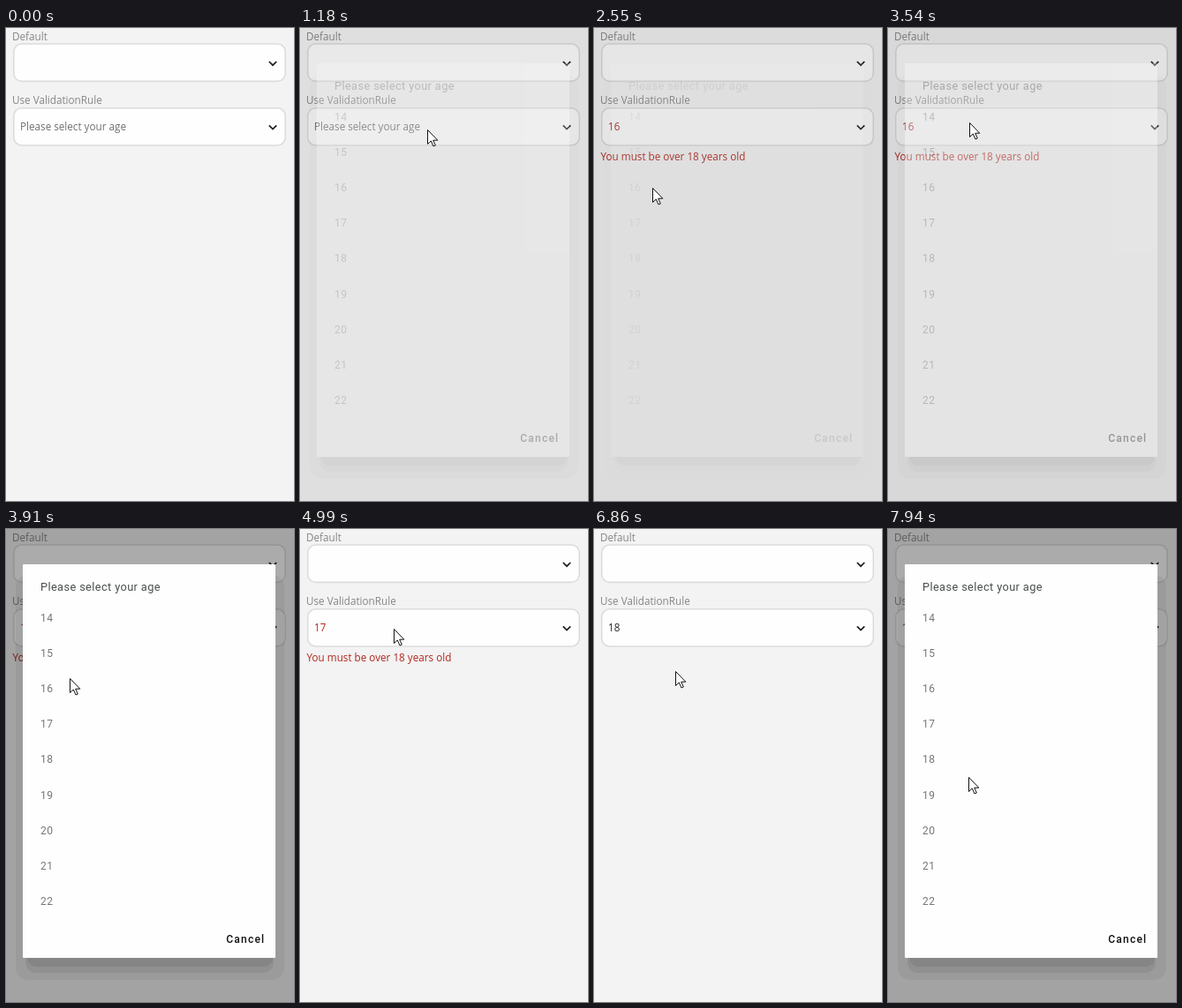
Recreate the animation shown at these times as an HTML page. Size 326 by 536 pixels, loop 7990 ms.

```html
<!DOCTYPE html>
<html lang="en">
<head>
<meta charset="utf-8">
<title>Age picker with validation</title>
<style>
  html, body { margin: 0; width: 100%; height: 100%; overflow: hidden; background: #f3f3f3; }
  svg { display: block; }
  .form { font: 11.7px "Open Sans", sans-serif; }
  .label { fill: #868686; }
  .field { fill: #fefefe; stroke: #dcdcdc; stroke-width: 1.6; }
  .chevron { fill: none; stroke: #1c1c1c; stroke-width: 1.7; }
  .dialog { font: 12px Roboto, sans-serif; }
  .title { font-size: 12.75px; letter-spacing: .03125em; fill: #474d4d; }
  .item { letter-spacing: .4px; fill: #757575; }
  .cancel { font-weight: 500; letter-spacing: 1.2px; fill: #111; }
</style>
</head>
<body>
<svg width="326" height="536" viewBox="0 0 326 536">
  <defs>
    <clipPath id="outside"><path clip-rule="evenodd" d="M0 0H326V536H0ZM19 40V486H305V40Z"/></clipPath>
  </defs>
  <rect width="326" height="536" fill="#f3f3f3"/>
  <g class="form">
    <text class="label" x="7" y="13.5">Default</text>
    <rect class="field" x="8.8" y="18" width="307.4" height="42.4" rx="9"/>
    <path class="chevron" d="M297.8 38L302 42.2L306.2 38"/>
    <text class="label" x="7" y="86">Use ValidationRule</text>
    <rect class="field" x="8.8" y="90.8" width="307.4" height="42.2" rx="9"/>
    <path class="chevron" d="M297.8 110.4L302 114.6L306.2 110.4"/>
    <text id="value" x="16" y="116"></text>
    <text id="error" x="7.6" y="150" fill="#b3261e">You must be over 18 years old</text>
  </g>
  <rect id="dim" width="326" height="536"/>
  <g clip-path="url(#outside)">
    <g id="halo">
      <rect x="11" y="52" width="304" height="459" rx="14" opacity=".05"/>
      <rect x="22" y="60" width="281" height="443" rx="12" opacity=".07"/>
    </g>
    <rect id="core" x="24" y="60" width="278" height="436" rx="10"/>
  </g>
  <g id="dialog" class="dialog">
    <rect x="19" y="40" width="286" height="446" rx="1" fill="#fefefe"/>
    <text class="title" x="39" y="69.5">Please select your age</text>
    <g id="items"></g>
    <text class="cancel" x="249.3" y="468.5">Cancel</text>
  </g>
  <path id="cursor" d="M.5 .5V16.5L4.3 13L7 19L9.3 18L6.7 12.2H11.8Z" fill="#fff" stroke="#111"/>
</svg>
<script>
const LOOP = 7990;
const $ = id => document.getElementById(id);

// [start, end, x, y]: the pointer glides to x, y
const moves = [
  [230, 790, 144, 115],
  [1790, 2120, 66, 181],
  [2740, 2920, 92, 107],
  [3770, 4280, 54, 223],
  [4740, 4990, 106, 113],
  [5540, 5830, 79, 262],
  [6720, 7090, 98, 112],
  [7800, 7940, 91, 281]
];
const opens = [[1180, 1320], [3540, 3630], [5360, 5500], [7610, 7750]];
const closes = [[2460, 2600], [4560, 4700], [6250, 6390]];
const picks = ["16", "17", "18"];

for (let i = 0; i < 9; i++) {
  const text = document.createElementNS("http://www.w3.org/2000/svg", "text");
  text.setAttribute("class", "item");
  text.setAttribute("x", 39);
  text.setAttribute("y", 104.6 + i * 40.2);
  text.textContent = 14 + i;
  $("items").append(text);
}

const clamp = v => Math.min(1, Math.max(0, v));

// Progress in discrete screen refreshes of about 46 ms; the first one falls on start.
function progress(t, [start, end]) {
  if (t < start) return 0;
  const n = Math.round((end - start) / 46.5) + 1;
  const i = Math.floor((t - start) / (end - start) * (n - 1) + 0.1);
  return clamp((i + 1) / n);
}

function pointer(t) {
  let x = 33, y = 291;
  for (const move of moves) {
    const k = 1 - Math.pow(1 - progress(t, move), 1.9);
    x += (move[2] - x) * k;
    y += (move[3] - y) * k;
  }
  return [Math.round(x), Math.round(y)];
}

function dialogState(t) {
  let fade = 0, dim = 0;
  opens.forEach((span, i) => {
    if (t < span[0]) return;
    fade = dim = progress(t, span);
    if (closes[i] && t >= closes[i][0]) {
      const u = progress(t, closes[i]);
      fade = clamp(1.155 - 1.42 * u);
      dim = clamp(1.2 - 1.22 * u);
    }
  });
  return { fade, dim };
}

function render(t) {
  const { fade, dim } = dialogState(t);
  $("dim").setAttribute("opacity", 0.33 * dim);
  $("halo").setAttribute("opacity", fade);
  $("core").setAttribute("opacity", 0.08 * dim);
  $("dialog").setAttribute("opacity", fade);

  const count = closes.filter(span => t >= span[0]).length;
  const age = picks[count - 1];
  const invalid = age < 18;
  $("value").textContent = age || "Please select your age";
  $("value").setAttribute("fill", !age ? "#707070" : invalid ? "#b3261e" : "#222");
  $("error").setAttribute("visibility", invalid ? "visible" : "hidden");

  $("cursor").setAttribute("transform", `translate(${pointer(t)})`);
  $("cursor").setAttribute("visibility", t < moves[0][0] ? "hidden" : "visible");
}

const began = performance.now();
function tick() {
  render((performance.now() - began) % LOOP);
  requestAnimationFrame(tick);
}
tick();
</script>
</body>
</html>
```
